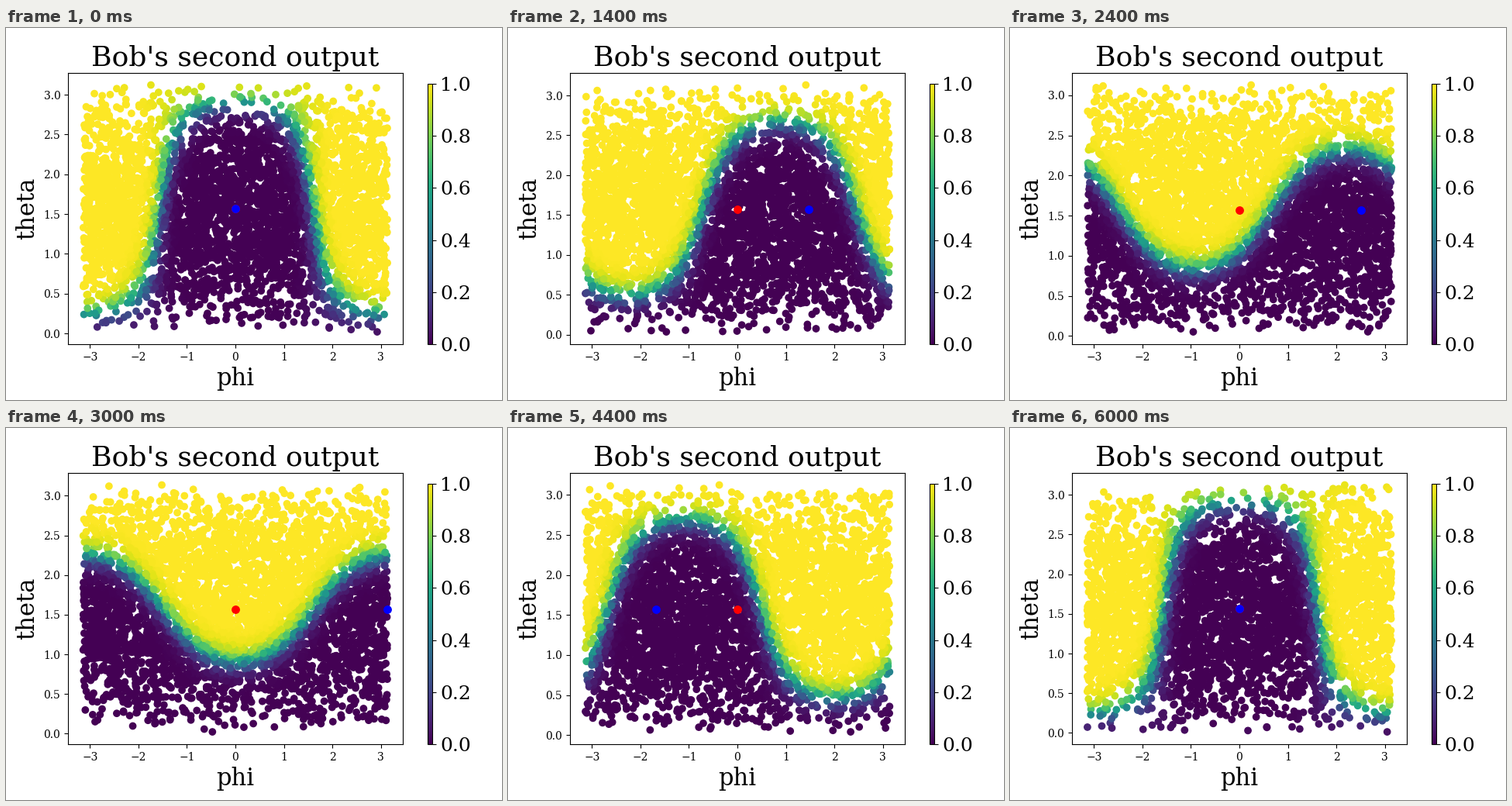
A matplotlib script that plays this animation: 640 by 480 pixels, repeating every 6200 ms.

```python
import numpy as np
import matplotlib.pyplot as plt
from matplotlib.animation import FuncAnimation

FRAMES, STEP_MS = 31, 200
POINTS = 4000
SHARPNESS = 14

plt.rcParams["font.family"] = "DejaVu Serif"


def sphere_points(k):
    """Uniform random directions on the sphere as (phi, theta)."""
    rng = np.random.default_rng(100 + k)
    phi = rng.uniform(-np.pi, np.pi, POINTS)
    theta = np.arccos(rng.uniform(-1, 1, POINTS))
    return phi, theta


def response(phi, theta, a):
    """Smooth step across a great circle whose pole follows the angle a."""
    tilt = 0.516 - 0.333 * np.cos(a) + 0.051 * np.cos(2 * a) + 0.048 * np.sin(a)
    pole = (a + 0.019 - 0.02 * np.cos(a) - 0.589 * np.sin(a)
            + 0.021 * np.cos(2 * a) - 0.02 * np.sin(2 * a))
    d = (np.cos(tilt) * np.sin(theta) * np.cos(phi - pole)
         + np.sin(tilt) * np.cos(theta))
    return 1 / (1 + np.exp(SHARPNESS * d))


fig, ax = plt.subplots(figsize=(6.4, 4.8), dpi=100)
fig.subplots_adjust(left=0.125, right=0.8, bottom=0.15, top=0.88)
ax.set_title("Bob's second output", fontsize=26)
ax.set_xlabel("phi", fontsize=22)
ax.set_ylabel("theta", fontsize=22)
ax.set_xlim(-1.1 * np.pi, 1.1 * np.pi)
ax.set_xticks(range(-3, 4))
ax.set_yticks(np.arange(0, 3.1, 0.5))

cloud = ax.scatter(np.zeros(POINTS), np.zeros(POINTS), c=np.zeros(POINTS),
                   cmap="viridis", vmin=0, vmax=1)
start = ax.scatter([0], [np.pi / 2], s=46, color="red")
marker = ax.scatter([0], [np.pi / 2], s=46, color="blue")

bar = fig.colorbar(cloud, cax=fig.add_axes([0.85, 0.15, 0.01, 0.7]),
                   ticks=np.linspace(0, 1, 6))
bar.ax.tick_params(labelsize=18)


def update(k):
    a = 2 * np.pi * k / (FRAMES - 1)
    phi, theta = sphere_points(k)
    cloud.set_offsets(np.column_stack([phi, theta]))
    cloud.set_array(response(phi, theta, a))
    marker.set_offsets([[a if a <= np.pi else a - 2 * np.pi, np.pi / 2]])
    lo, hi = theta.min(), theta.max()
    margin = 0.05 * (hi - lo)
    ax.set_ylim(lo - margin, hi + margin)
    return cloud, marker


anim = FuncAnimation(fig, update, frames=FRAMES, interval=STEP_MS,
                     init_func=lambda: update(0), repeat=True, repeat_delay=0)
plt.show()
```
